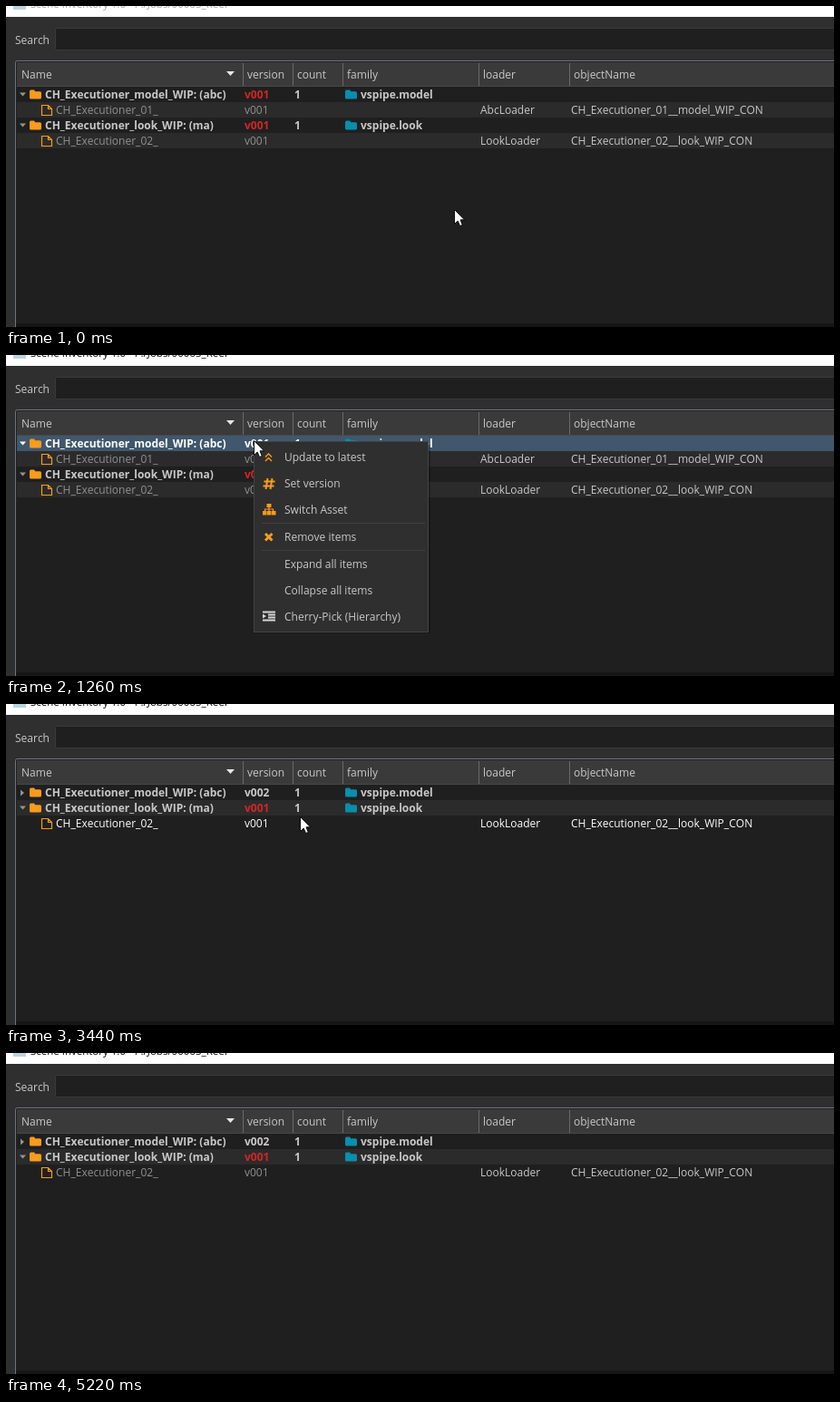
An HTML page that plays this animation: 913 px wide and 354 px high, repeating every 5450 ms.

```html
<!DOCTYPE html>
<html lang="en">
<head>
<meta charset="utf-8">
<title>Scene inventory</title>
<style>
  html, body { margin: 0; width: 100%; height: 100%; overflow: hidden; background: #2f2f2f; }
  svg { display: block; width: 913px; height: 354px; }
  .label { font: 12px/17px "Open Sans", "Noto Sans", sans-serif; font-kerning: none; color: #c8c8c8; white-space: pre; overflow: visible; }
  .title { font-size: 11.5px; }
  .bold .label { font-weight: 700; }
  .dim { color: #909090; }
  .bold .old { color: #d32626; }
  .arrow { fill: #98938c; }
  .hover .label, .hover .dim, .hover .old { color: #fff; }
  .hover .arrow { fill: #fff; }
</style>
</head>
<body>
<svg id="stage" viewBox="0 0 913 354" xmlns="http://www.w3.org/2000/svg"></svg>
<script>
const LOOP = 5450, ROW_TOP = 89, ROW_H = 17, UPDATE_AT = 3440;
const ORANGE = '#f99b1c', BLUE = '#088eae', SELECT = '#40576d';
const stage = document.getElementById('stage');

function add(parent, tag, attrs = {}, content = '') {
  const node = document.createElementNS('http://www.w3.org/2000/svg', tag);
  for (const key in attrs) node.setAttribute(key, attrs[key]);
  node.textContent = content;
  return parent.appendChild(node);
}
const group = (parent, attrs) => add(parent, 'g', attrs);
const rect = (parent, x, y, width, height, fill) => add(parent, 'rect', { x, y, width, height, fill });
const path = (parent, d, attrs) => add(parent, 'path', { d, ...attrs });
// HTML text layout keeps whole-pixel letter advances, as in the desktop interface
const label = (parent, x, base, content, cls = '') =>
  add(parent, 'foreignObject', { x, y: base - 13, width: 280, height: 17, class: 'label ' + cls }, content);
const show = (node, visible) => node.setAttribute('visibility', visible ? 'visible' : 'hidden');

// Window
rect(stage, 0, 0, 913, 354, '#2f2f2f');
rect(stage, 0, 0, 913, 12, '#fff');
rect(stage, 8, 0, 14, 4, '#b9d3e2');
const title = label(stage, 27, 2, 'Scene Inventory 1.0 - P:/Jobs/00065_Reef', 'title');
label(stage, 10, 42, 'Search');
add(stage, 'rect', { x: 54.5, y: 24.5, width: 870, height: 24, rx: 1, fill: '#1f1f1f', stroke: '#3a3a3a' });

// Table frame and header
rect(stage, 11, 61, 902, 293, '#1f1f1f');
rect(stage, 12, 62, 901, 27, '#3a3a3a');
rect(stage, 12, 88, 901, 1, '#484848');
path(stage, 'M913 60.5H12.5Q10.5 60.5 10.5 62.5V354', { fill: 'none', stroke: '#6c7684' });
for (const x of [261, 316, 371, 521, 621]) rect(stage, x, 63, 1, 25, '#6a6a6a');
[[17, 'Name'], [266, 'version'], [321, 'count'], [376, 'family'], [526, 'loader'], [626, 'objectName']]
  .forEach(([x, name]) => label(stage, x, 80, name));
path(stage, 'M243 72h9l-4.5 5z', { fill: '#e6e6e6' });
rect(stage, 11, 350, 902, 4, '#171518');

// Table rows
function folder(parent, x, y, fill) {
  path(parent, `M${x} ${y + 1.5}q0-1.5 1.5-1.5h3.2q1.3 0 1.3 1.7h5.3q1.7 0 1.7 1.6v5.2q0 1.5-1.5 1.5h-10q-1.5 0-1.5-1.5z`, { fill });
}

function makeRow(parent, index, data) {
  const y = ROW_TOP + index * ROW_H, base = y + 13;
  if (index % 2) rect(parent, 12, y, 901, ROW_H, '#2b2b2b');
  const row = group(parent, { class: data.family ? 'bold' : '' });
  if (data.family) {
    const bar = rect(row, 12, y, 901, ROW_H, SELECT);
    show(bar, false);
    row.bar = bar;
    path(row, data.closed ? `M16 ${y + 5.5}v7l4-3.5z` : `M15 ${y + 6.5}h7l-3.5 4z`, { class: 'arrow' });
    folder(row, 26, y + 3.5, ORANGE);
    label(row, 43, base, data.name);
    label(row, 263, base, data.version, data.version === 'v001' ? 'old' : '');
    label(row, 318, base, '1');
    folder(row, 374, y + 3.5, BLUE);
    label(row, 391, base, data.family);
  } else {
    path(row, `M39.5 ${y + 3.5}h7l4 4v7h-11zM46.5 ${y + 3.5}v4h4`, { fill: 'none', stroke: ORANGE, 'stroke-width': 1.2 });
    label(row, 55, base, data.name, 'dim');
    label(row, 263, base, 'v001', 'dim');
    label(row, 523, base, data.loader);
    label(row, 623, base, data.object);
  }
  return row;
}

const model = { name: 'CH_Executioner_model_WIP: (abc)', version: 'v001', family: 'vspipe.model' };
const modelItem = { name: 'CH_Executioner_01_', loader: 'AbcLoader', object: 'CH_Executioner_01__model_WIP_CON' };
const look = { name: 'CH_Executioner_look_WIP: (ma)', version: 'v001', family: 'vspipe.look' };
const lookItem = { name: 'CH_Executioner_02_', loader: 'LookLoader', object: 'CH_Executioner_02__look_WIP_CON' };

function makeTable(items) {
  const root = group(stage);
  return { root, rows: items.map((item, i) => makeRow(root, i, item)) };
}
const before = makeTable([model, modelItem, look, lookItem]);
const after = makeTable([{ ...model, version: 'v002', closed: true }, look, lookItem]);

// Context menu
const menu = group(stage);
rect(menu, 275, 97, 193, 210, 'rgba(0,0,0,.25)');
add(menu, 'rect', { x: 273.5, y: 95.5, width: 192, height: 210, fill: '#2f2f2f', stroke: '#434343' });
const highlight = rect(menu, 281, 98, 182, 29, SELECT);
for (const y of [185, 215]) rect(menu, 282, y, 180, 1, '#404040');
const items = [[117, 'Update to latest'], [146, 'Set version'], [175, 'Switch Asset'], [205, 'Remove items'],
  [235, 'Expand all items'], [264, 'Collapse all items'], [293, 'Cherry-Pick (Hierarchy)']]
  .map(([y, name]) => label(menu, 307, y, name));
const stroke = (d, width, color = ORANGE) => path(menu, d, { fill: 'none', stroke: color, 'stroke-width': width });
stroke('M286 112.5l3.5-3.5 3.5 3.5M286 117l3.5-3.5 3.5 3.5', 1.4);
stroke('M288.5 136l-2 12M293.5 136l-2 12M284.5 139.5h12M283.5 144.5h12', 2);
stroke('M290 167v5M285.5 173v-3h9v3', 1.2);
path(menu, 'M287.5 164h5v4h-5zM283 172h4.5v4.5h-4.5zM288 172h4.5v4.5h-4.5zM293 172h4.5v4.5h-4.5z', { fill: ORANGE });
stroke('M286 197l7.5 7.5M293.5 197l-7.5 7.5', 3);
stroke('M283 283.5h14M289 286.5h8M289 289.5h8M283 292.5h14', 1.8, '#d6d6d6');
path(menu, 'M283 285.5l4 2.5-4 2.5z', { fill: '#d6d6d6' });

// Click mark and pointer
const click = add(stage, 'circle', { cx: 315.5, cy: 114.5, r: 12, fill: '#c8ba1e', 'fill-opacity': .85 });
const pointer = path(stage, 'M.5 .5V16.5L4.2 13 6.6 18.5 9.3 17.4 7 11.8H11.5z',
  { fill: '#fff', stroke: '#000', 'stroke-width': .9 });

// Pointer moves: first step, last step, step count, end point, ease-out power
const moves = [
  [70, 560, 8, 282, 102, 2],
  [640, 790, 3, 273, 94, 1.5],
  [1660, 1810, 3, 299, 128, 1],
  [1960, 1960, 1, 306, 127, 1],
  [2120, 2350, 4, 315, 114, 1.5],
  [3440, 3830, 6, 353, 155, 1.5],
  [4380, 4530, 3, 330, 141, 1],
  [4610, 4680, 2, 284, 117, 3],
  [4760, 4920, 3, 274, 97, 1.5],
  [4990, 5140, 3, 623, 289, 1]
];

function pointerAt(t) {
  let x = 494, y = 224;
  for (const [start, end, count, toX, toY, power] of moves) {
    if (t < start) break;
    const gap = (end - start) / (count - 1 || 1) || 1;
    const step = Math.min(count, Math.floor((t - start + 4) / gap) + 1);
    const p = 1 - (1 - step / count) ** power;
    x += (toX - x) * p;
    y += (toY - y) * p;
  }
  return { x: Math.round(x), y: Math.round(y) };
}

// Value of the last entry whose time has come
const latest = (t, entries) => entries.reduce((value, [at, next]) => t >= at ? next : value, 0);

function render(t) {
  const { x, y } = pointerAt(t);
  const selected = t >= 1110 && t < UPDATE_AT;
  const visible = t < 5220;
  const table = t < UPDATE_AT ? before : after;
  show(pointer, visible);
  pointer.setAttribute('transform', `translate(${x} ${y})`);
  title.style.color = t < 1110 ? '#a0a0a0' : '#000';

  before.root.style.display = table === before ? '' : 'none';
  after.root.style.display = table === after ? '' : 'none';
  const hovered = selected ? 0 : visible ? Math.floor((y - ROW_TOP) / ROW_H) : -1;
  table.rows.forEach((row, i) => row.classList.toggle('hover', i === hovered));
  show(before.rows[0].bar, selected);

  const opacity = latest(t, [[1110, .35], [1190, .75], [1260, 1], [3120, .6], [3190, .25], [3290, 0]]);
  menu.style.display = opacity ? '' : 'none';
  menu.setAttribute('opacity', opacity);
  const active = t < 1660 || y < 98 ? -1 : y < 127 ? 0 : 1;
  highlight.setAttribute('y', 98 + 29 * Math.max(active, 0));
  highlight.style.display = active < 0 ? 'none' : '';
  items.forEach((item, i) => { item.style.color = i === active ? '#0b0b0b' : ''; });

  click.style.display = t >= 2970 && t < 3190 ? '' : 'none';
  click.setAttribute('opacity', latest(t, [[2970, 1], [3040, .75], [3120, .35]]));
}

const began = performance.now();
function tick() {
  render((performance.now() - began) % LOOP);
  requestAnimationFrame(tick);
}
tick();
</script>
</body>
</html>
```
